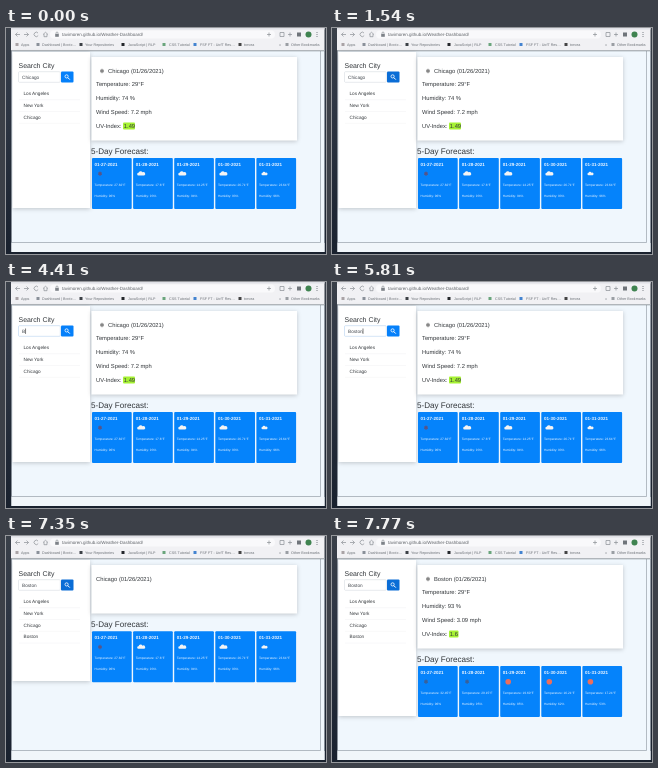
These frames come from a looping animation (320 by 226 pixels, 8 s). An HTML page:

```html
<!DOCTYPE html>
<html lang="en">
<head>
<meta charset="utf-8">
<title>Weather Dashboard</title>
<style>
html, body { margin: 0; width: 100%; height: 100%; overflow: hidden; background: #f0f7fc; }
svg { display: block; width: 100vw; height: 100vh; }
text { font-family: "Liberation Sans", Arial, sans-serif; fill: #33373b; text-rendering: geometricPrecision; white-space: pre; }
.tiny { font-size: 3.7px; fill: #6b7076; }
.info text { font-size: 5.8px; }
.list text, .field { font-size: 4.7px; }
.day text { fill: #eef6ff; font-size: 3.2px; }
.day .date { font-size: 4.5px; font-weight: bold; }
.line { fill: none; stroke: #8b9096; stroke-width: .7; }
.shade { filter: drop-shadow(0 1px 2px #0003); }
</style>
</head>
<body>
<svg viewBox="0 0 320 226">
  <defs>
    <linearGradient id="desk" x2="0" y2="1">
      <stop offset="0" stop-color="#3a4049"/>
      <stop offset=".3" stop-color="#303846"/>
      <stop offset="1" stop-color="#19212e"/>
    </linearGradient>
    <g id="flake" stroke-width=".6">
      <path d="M0-2.3V2.3M-2-1.1L2 1.1M-2 1.1L2-1.1"/>
      <circle r="1.3" fill="none"/>
    </g>
    <path id="cloud" d="M-3 2.2a1.6 1.6 0 0 1 0-3.2a2.6 2.6 0 0 1 4.7-.6a2 2 0 0 1 2 3.8z" fill="#f4f4f4"/>
    <circle id="sun" r="2.8" fill="#ec6e5c"/>
  </defs>

  <rect width="320" height="226" fill="url(#desk)"/>
  <rect x="5.5" y="22" width="313" height="202" fill="#f0f7fd"/>
  <rect x="5.5" y="215" width="313" height="9" fill="#f1f6fa"/>
  <path d="M5.5 214.5H314.5V23" fill="none" stroke="#98a1a9" stroke-width=".7"/>

  <rect x="5" width="313.5" height="22.5" fill="#f1f1f4"/>
  <rect x="5" width="313.5" height="1.5" fill="#dfe0e6"/>
  <rect x="44" y="2.5" width="225" height="8" rx="4" fill="#f9f9fb"/>
  <path d="M5 22.8H318.5" stroke="#6d737a" stroke-width=".7"/>
  <g class="line">
    <path d="M14 6.5H9.5l2-2m-2 2l2 2M18 6.5h4.5l-2-2m2 2l-2 2M32 5a2.2 2.2 0 1 0 .2 2.5M37 6.5l2.5-2.2L42 6.5M38 6v2.7h3V6"/>
    <path d="M50 6v-1a1 1 0 0 1 2 0v1M261 6.5h4m-2-2v4M274 4.5h4v4h-4zM282 6.5h4m-2-2v4"/>
  </g>
  <rect x="49.2" y="6" width="3.6" height="2.8" fill="#7d8288"/>
  <rect x="291" y="4.5" width="4" height="4" fill="#6f747a"/>
  <circle cx="302.5" cy="6.5" r="3" fill="#3f8350"/>
  <path d="M311 4v5" stroke="#7d8288" stroke-dasharray="1"/>
  <text x="56" y="8.2" font-size="4.5" style="fill:#5f6368">tavimoren.github.io/Weather-Dashboard/</text>
  <g id="marks"></g>

  <g class="shade"><rect id="side" x="6.5" y="24" width="77.5" height="156" fill="#fff"/></g>
  <text x="12.5" y="40" font-size="6.95">Search City</text>
  <rect id="box" x="12.5" y="43.7" width="41.8" height="10.6" rx="1" fill="#fff" stroke-width=".5"/>
  <text id="field" class="field" x="16" y="50.8"></text>
  <path id="caret" stroke="#222" stroke-width=".6"/>
  <path id="beam" d="M48.3 47h1.4M49 47v5M48.3 52h1.4" stroke="#333" stroke-width=".5"/>
  <rect id="button" x="55" y="43.5" width="12.5" height="11" rx="1"/>
  <path d="M61.8 49.6l2 2" stroke="#fff" stroke-width="1"/>
  <circle cx="60.6" cy="48.4" r="1.6" fill="none" stroke="#fff" stroke-width=".8"/>
  <g id="list" class="list"></g>

  <g class="shade"><rect id="card" x="85.5" y="29" width="205.5" height="83.5" fill="#fff"/></g>
  <g id="info" class="info"></g>
  <g id="forecast"></g>
</svg>
<script>
const $ = id => document.getElementById(id);
const set = (id, attrs) => { for (const k in attrs) $(id).setAttribute(k, attrs[k]); };
const text = (x, y, s, cls = "") => `<text x="${x}" y="${y}" class="${cls}">${s}</text>`;
const icon = (name, x, y, ink = "#6a6a6a", size = 1) =>
  `<use href="#${name}" transform="translate(${x} ${y}) scale(${size})" stroke="${name == "flake" ? ink : "none"}"/>`;

const reports = {
  Chicago: {
    humidity: 74, wind: 7.2, uv: "1.49",
    icons: ["flake", "cloud", "cloud", "cloud", "cloud"],
    temps: ["27.82", "17.6", "14.25", "26.71", "23.64"],
    wet: [96, 93, 94, 93, 96]
  },
  Boston: {
    humidity: 93, wind: 3.09, uv: "1.6",
    icons: ["flake", "flake", "sun", "sun", "sun"],
    temps: ["32.45", "29.15", "19.60", "16.21", "17.24"],
    wet: [96, 95, 85, 62, 53]
  }
};

$("marks").innerHTML = [
  [15, "Apps", 11, "#a9a3a6"], [36, "Dashboard | Bootc…", 32, "#8a9099"],
  [79, "Your Repositories", 75, "#3c4146"], [122, "JavaScript | RLP", 117, "#24272b"],
  [163, "CSS Tutorial", 158, "#6aa57c"], [194, "FSF FT - UofT Res…", 189, "#4383d0"],
  [238, "torvea", 234, "#444"], [273, "»"], [285, "Other Bookmarks", 281, "#9a9ea3"]
].map(([x, s, cx, color]) => text(x, 17.8, s, "tiny") +
  (cx ? `<rect x="${cx - 1.5}" y="15" width="3" height="3" fill="${color}"/>` : "")).join("");

function details(city, loading) {
  const title = city + " (01/26/2021)";
  if (loading) return text(90, 45, title);
  const r = reports[city];
  return icon("flake", 96, 43) + text(102, 45, title) +
    text(90, 58.2, "Temperature: 29°F") + text(90, 72, `Humidity: ${r.humidity} %`) +
    text(90, 86, `Wind Speed: ${r.wind} mph`) + text(90, 100, "UV-Index:") +
    `<rect x="117" y="94.6" width="${r.uv.length * 2.5 + 2}" height="7" rx="1" fill="#a6f233"/>` +
    text(117.8, 100, r.uv);
}

function days(city) {
  const r = reports[city];
  return `<text x="85" y="125.6" font-size="8.1">5-Day Forecast:</text>` +
    r.icons.map((name, i) => {
      const x = 86 + i * 41.1;
      const ink = i || city == "Boston" ? "#4b5a80" : "#6d4a6c";
      const size = name == "cloud" ? (i == 4 ? .65 : .85) : 1;
      return `<g class="day"><rect x="${x}" y="130" width="39.7" height="51" rx="1" fill="#0583fb"/>` +
        text(x + 2.6, 137.6, `01-${27 + i}-2021`, "date") +
        icon(name, x + 8, 145.7, ink, size) +
        text(x + 2.6, 157.8, `Temperature: ${r.temps[i]}°F`) +
        text(x + 2.6, 168.7, `Humidity: ${r.wet[i]}%`) + "</g>";
    }).join("");
}

const keys = [4270, 4830, 5040, 5390, 5530, 5810];
const cities = ["Los Angeles", "New York", "Chicago", "Boston"];
let shown;

// Rebuild the results only when the search state changes.
function showResults(state) {
  if (state === shown) return;
  shown = state;
  const loading = state == 1, city = state == 2 ? "Boston" : "Chicago";
  set("side", { height: loading ? 121 : 156 });
  set("card", { height: loading ? 48.5 : 83.5 });
  set("forecast", { transform: `translate(0 ${loading ? -34.7 : 0})` });
  $("info").innerHTML = details(city, loading);
  $("forecast").innerHTML = days(city);
  $("list").innerHTML = cities.slice(0, state ? 4 : 3).map((s, i) =>
    text(17.5, 67 + i * 11.8, s) +
    `<path d="M13 ${71.7 + i * 11.8}H74" stroke="#f0f1f2" stroke-width=".5"/>`).join("");
}

function draw(t) {
  const typed = keys.filter(k => t >= k).length;
  const empty = t >= 3220 && !typed;
  const focus = t >= 2100 && t < 6650;
  const hover = t >= 1120 && t < 2100 || t >= 6650;
  $("field").textContent = t < 3220 ? "Chicago" : empty ? "Search City" : "Boston".slice(0, typed);
  $("field").style.fill = empty ? "#7b838a" : "#40464c";
  const end = empty ? 16 : 16.4 + $("field").getComputedTextLength();
  set("caret", {
    d: `M${end} 46.5v5.4`,
    visibility: t >= 3220 && t < 3710 || typed && t < 6370 ? "visible" : "hidden"
  });
  set("beam", { visibility: t >= 1890 && t < 3220 || t >= 6370 && t < 6510 ? "visible" : "hidden" });
  set("box", { stroke: focus ? "#a9c9ec" : "#ced4da" });
  set("button", { fill: hover ? "#0a6dd6" : "#0580fa" });
  showResults(t < 7350 ? 0 : t < 7420 ? 1 : 2);
}

const start = performance.now();
function tick() {
  draw((performance.now() - start) % 8000);
  requestAnimationFrame(tick);
}
tick();
</script>
</body>
</html>
```
